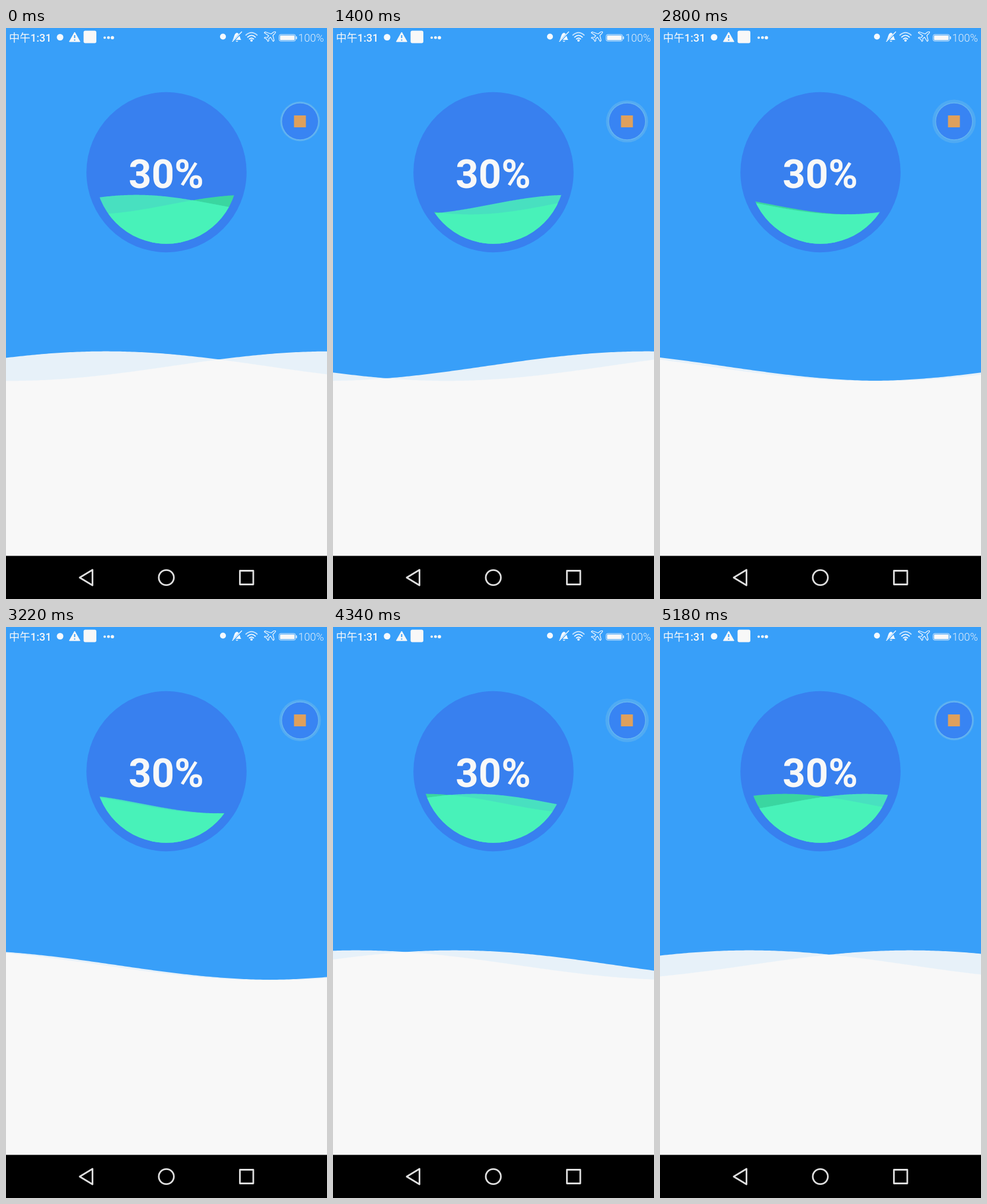
Animation, 540 px wide and 960 px high, one loop 5250 ms. Source, as an HTML page:

```html
<!DOCTYPE html>
<html lang="zh">
<head>
<meta charset="utf-8">
<title>Wave progress</title>
<style>
  html, body { margin: 0; width: 100%; height: 100%; overflow: hidden; background: #389ff9; }
  svg { display: block; width: 540px; height: 960px; }
  text { font-family: Roboto, "Noto Sans CJK SC", "Noto Sans CJK JP", sans-serif; fill: #f8f8f8; }
  .line { fill: none; stroke: #f4f9fe; stroke-linecap: round; stroke-linejoin: round; }
</style>
</head>
<body>
<svg viewBox="0 0 540 960">
  <defs>
    <clipPath id="bowl"><circle cx="270" cy="242.5" r="120.2"/></clipPath>
  </defs>
  <rect width="540" height="960" fill="#389ff9"/>

  <!-- Page waves -->
  <path id="pageEither" fill="#e7f1f9"/>
  <path id="pageBoth" fill="#f8f8f8"/>

  <!-- Progress ball -->
  <circle cx="270" cy="242.5" r="134.7" fill="#3880ef"/>
  <g clip-path="url(#bowl)">
    <path id="ballSlow" fill="#3ad6a0"/>
    <path id="ballFast" fill="#48e0c0"/>
    <path id="ballBoth" fill="#48f2b9"/>
  </g>
  <text x="269.5" y="269.3" font-size="67" font-weight="700" text-anchor="middle">30%</text>

  <!-- Pulsing button -->
  <circle id="halo" cx="494.7" cy="157" fill="#62b4ef"/>
  <circle id="rim" cx="494.7" cy="157" r="31" fill="none" stroke="#7dbdf0" stroke-width="1.5"/>
  <circle cx="494.7" cy="157" r="30.3" fill="#3884f3"/>
  <rect x="484.5" y="147" width="20" height="20" fill="#dfa05c"/>

  <!-- Status bar -->
  <text x="5" y="23" font-size="18" font-weight="500">中午1:31</text>
  <circle cx="91" cy="15.5" r="5.5" fill="#f4f9fe"/>
  <path d="M115.5 7 L124.5 23 H106.5 Z" fill="#f8f8f8" stroke="#f8f8f8" stroke-linejoin="round"/>
  <path d="M115.5 12 V17 M115.5 19.3 V21.3" stroke="#389ff9" stroke-width="2"/>
  <rect x="130.5" y="4.5" width="21.5" height="21" rx="3" fill="#f8f8f8"/>
  <g fill="#f8f8f8">
    <circle cx="166" cy="16.2" r="2"/>
    <circle cx="172.4" cy="16.2" r="2.4"/>
    <circle cx="179" cy="16.2" r="2.8"/>
  </g>
  <circle cx="365" cy="14.5" r="5" fill="#f4f9fe"/>
  <path d="M381 20 C384 18 383 9 388.5 8 C394 9 393 18 396 20 Z M386 21.5 H391 L388.5 23.5 Z" fill="#f4f9fe"/>
  <path d="M381 23.5 L397 6.5" stroke="#389ff9" stroke-width="3"/>
  <path class="line" d="M381 22.5 L396.5 6.5" stroke-width="1.4"/>
  <g class="line" stroke-width="1.8">
    <path d="M403.5 12 Q413 3.5 422.5 12" opacity=".75"/>
    <path d="M406.5 15.3 Q413 9.5 419.5 15.3"/>
    <path d="M409.5 18.5 Q413 15.5 416.5 18.5"/>
  </g>
  <circle cx="413" cy="21" r="2" fill="#f4f9fe"/>
  <path class="line" stroke-width="1.2" d="M453.5 6.5 Q451 5.5 448 8.5 L446 10 L436 6.5 L434.5 8 L442 13 L439.5 16 L435.5 15.5 L434.5 16.8 L438.5 18.8 L440.5 22.5 L442 21.5 L442 18 L445 15.5 L449.5 22.5 L451 21 L449 12.5 L451 10.5 Q454 8 453.5 6.5 Z"/>
  <rect x="459.5" y="11" width="27.5" height="11" rx="2.5" fill="none" stroke="#dcecfb"/>
  <rect x="461" y="12.5" width="24.5" height="8" rx="1" fill="#f8f8f8"/>
  <rect x="487.5" y="14" width="2" height="5" rx="1" fill="#dcecfb"/>
  <text x="491.5" y="23" font-size="18" font-weight="300" opacity=".9">100%</text>

  <!-- Navigation bar -->
  <rect y="887.5" width="540" height="72.5" fill="#000"/>
  <g fill="none" stroke="#dfdfdf" stroke-width="2.8" stroke-linejoin="round">
    <path d="M124 924 L145.5 911 V937 Z"/>
    <circle cx="269.7" cy="924" r="12.7"/>
    <rect x="393.5" y="912.5" width="22.5" height="23"/>
  </g>
</svg>
<script>
  const LOOP = 5250, STEP = 70, PULSE = 515;
  const WIDTH = 540, K = Math.PI / WIDTH;
  const byId = id => document.getElementById(id);

  // Crest positions on the page, drifting to the right.
  const fastCrest = t => 168 + t * 1080 / 4200;
  const slowCrest = t => 548 + t * 1080 / 8200;

  const page = { left: 0, scale: 1, mid: 568.4, amp: 24.8, bottom: 890 };
  const ball = { left: 135.5, scale: 269 / WIDTH, mid: 297, amp: 16.4, bottom: 370 };

  const wave = (box, crest) => x => box.mid - box.amp * Math.cos(K * (x - crest));

  function fill(id, box, height) {
    let d = `M${box.left} ${box.bottom}`;
    for (let x = 0; x <= WIDTH; x += 4) {
      d += `L${(box.left + x * box.scale).toFixed(2)} ${height(x).toFixed(2)}`;
    }
    byId(id).setAttribute('d', d + `V${box.bottom}Z`);
  }

  function draw(t) {
    const waves = box => [wave(box, fastCrest(t)), wave(box, slowCrest(t))];
    const lower = (a, b) => x => Math.max(a(x), b(x));
    const upper = (a, b) => x => Math.min(a(x), b(x));

    const [pf, ps] = waves(page);
    fill('pageEither', page, upper(pf, ps));
    fill('pageBoth', page, lower(pf, ps));

    const [bf, bs] = waves(ball);
    fill('ballSlow', ball, bs);
    fill('ballFast', ball, bf);
    fill('ballBoth', ball, lower(bf, bs));

    const grow = (1 - Math.cos(2 * Math.PI * t / PULSE)) / 2;
    byId('halo').setAttribute('r', 33.4 + 3.2 * grow);
    byId('halo').setAttribute('opacity', 0.75 - 0.2 * grow);
    byId('rim').setAttribute('opacity', 0.5);
  }

  const start = performance.now();
  function tick() {
    const t = (performance.now() - start) % LOOP;
    draw(Math.floor(t / STEP) * STEP);
    requestAnimationFrame(tick);
  }
  tick();
</script>
</body>
</html>
```
